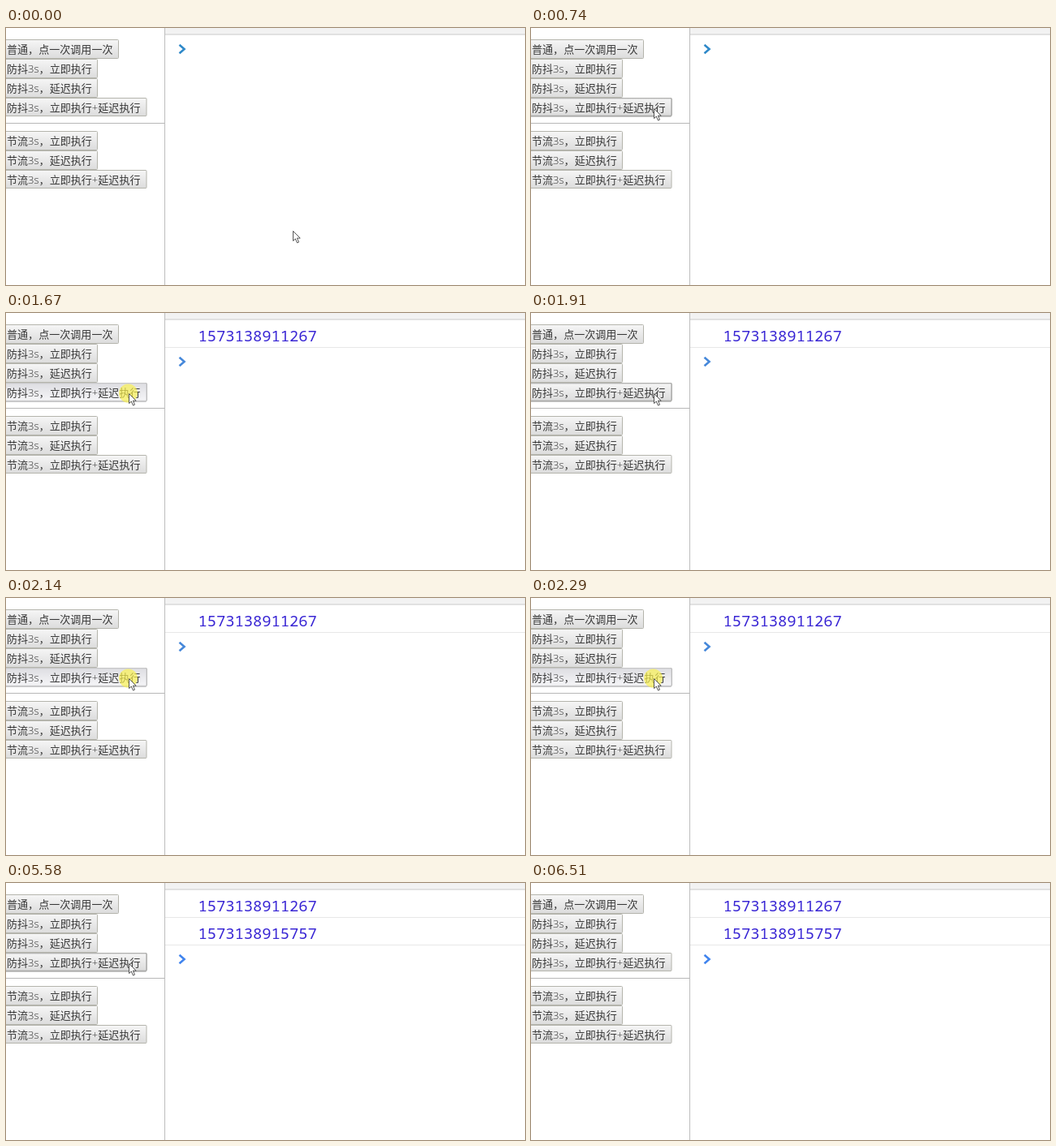
Write an HTML page that moves like this. It is 639 px wide and 317 px high and loops after 6.97 s.

```html
<!DOCTYPE html>
<html lang="zh-CN">
<head>
<meta charset="utf-8">
<title>防抖与节流</title>
<style>
html, body { margin: 0; width: 100%; height: 100%; overflow: hidden; background: #fff; }
svg { display: block; }

.button rect { fill: url(#raised); stroke: #b4b4ac; }
.button text { font: 350 13.05px "Open Sans", "Noto Sans CJK SC", "Noto Sans CJK", sans-serif; fill: #383838; }
.log text { font: 18.75px "Noto Sans Mono", monospace; fill: #3825d4; }
.log path { stroke: #e8e8e8; }
.prompt { fill: none; stroke-width: 2.6; }
.halo { fill: #fbf24e; fill-opacity: .68; }

.cursor, .pressed, .halo, .hover, .log, .prompt {
  animation: 6970ms step-end infinite;
}
.cursor { animation-name: move; }
.pressed, .halo { animation-name: press; }
.hover { animation-name: hover; }
.first { animation-name: first; }
.second { animation-name: second; }
.prompt { animation-name: prompt; }

.button .hover { stroke: #929292; }
.button .pressed { fill: url(#sunken); stroke: #c6c6c8; }

@keyframes move {
  0% { transform: translate(353px, 250px); }
  1% { transform: translate(353px, 250px); animation-timing-function: steps(4, jump-both); }
  5.3% { transform: translate(219px, 157px); }
  6.38% { transform: translate(219px, 157px); animation-timing-function: steps(4, jump-both); }
  10.61% { transform: translate(151px, 99px); }
  86.65% { transform: translate(151px, 99px); animation-timing-function: steps(5, jump-both); }
  92.25% { transform: translate(564px, 306px); }
  93.39%, 100% { transform: translate(700px, 400px); }
}
/* Eight clicks: down, then up */
@keyframes press {
  0%, 14.92%, 18.5%, 25.25%, 27.4%, 29.55%, 31.99%, 34.28%, 36.44%, 100% { opacity: 0; }
  13.91%, 17.36%, 23.95%, 26.25%, 28.4%, 30.7%, 32.85%, 35.29% { opacity: 1; }
}
@keyframes hover {
  0%, 86.65%, 100% { opacity: 0; }
  10.61% { opacity: 1; }
}
@keyframes first {
  0% { opacity: 0; }
  14.92%, 100% { opacity: 1; }
}
@keyframes second {
  0% { opacity: 0; }
  80.05%, 100% { opacity: 1; }
}
@keyframes prompt {
  0% { transform: translateY(0); stroke: #2f89c9; }
  14.92% { transform: translateY(34px); stroke: #4688da; }
  80.05%, 100% { transform: translateY(68px); stroke: #4084ee; }
}
</style>
</head>
<body>
<svg width="639" height="317">
  <defs>
    <linearGradient id="raised" x2="0" y2="1">
      <stop stop-color="#f6f6f6"/><stop offset="1" stop-color="#dcdcdc"/>
    </linearGradient>
    <linearGradient id="sunken" x2="0" y2="1">
      <stop stop-color="#dedee2"/><stop offset="1" stop-color="#f6f6f8"/>
    </linearGradient>
  </defs>

  <g class="button" transform="translate(0 14.5)">
    <rect x="-9.5" width="148" height="23" rx="1"/>
    <text x="1" y="16.8">普通，点一次调用一次</text>
  </g>
  <g class="button" transform="translate(0 38.5)">
    <rect x="-9.5" width="122" height="23" rx="1"/>
    <text x="1" y="16.5">防抖3s，立即执行</text>
  </g>
  <g class="button" transform="translate(0 62.5)">
    <rect x="-9.5" width="122" height="23" rx="1"/>
    <text x="1" y="16.5">防抖3s，延迟执行</text>
  </g>
  <g class="button" transform="translate(0 86.5)">
    <rect x="-9.5" width="182.5" height="22" rx="1"/>
    <rect class="hover" x="-9.5" width="182.5" height="22" rx="1"/>
    <rect class="pressed" x="-9.5" width="182.5" height="22" rx="1"/>
    <text x="1" y="16">防抖3s，立即执行+延迟执行</text>
  </g>
  <path d="M0 117.5H195" stroke="#b8b8b8"/>
  <g class="button" transform="translate(0 127.5)">
    <rect x="-9.5" width="122" height="23" rx="1"/>
    <text x="1" y="16.5">节流3s，立即执行</text>
  </g>
  <g class="button" transform="translate(0 151.5)">
    <rect x="-9.5" width="122" height="23" rx="1"/>
    <text x="1" y="16.5">节流3s，延迟执行</text>
  </g>
  <g class="button" transform="translate(0 175.5)">
    <rect x="-9.5" width="182.5" height="22" rx="1"/>
    <text x="1" y="16">节流3s，立即执行+延迟执行</text>
  </g>

  <rect x="195" width="444" height="8" fill="#f2f2f2"/>
  <path d="M195 8H639" stroke="#c9c9c9"/>
  <path d="M195.5 0V317" stroke="#bdbdbd"/>

  <g class="log first">
    <text x="236.5" y="34.5">1573138911267</text>
    <path d="M196 42.5H639"/>
  </g>
  <g class="log second">
    <text x="236.5" y="69">1573138915757</text>
    <path d="M196 76.5H639"/>
  </g>
  <path class="prompt" d="M213.5 20.8L219.5 26L213.5 31.2"/>

  <circle class="halo" cx="150.5" cy="99" r="11.5"/>
  <path class="cursor" d="M.5 .5V12.6L3.3 10L5.5 15L7.5 14.1L5.4 9.2H9.2Z" fill="#fff" stroke="#444" stroke-width=".9"/>
</svg>
</body>
</html>
```
